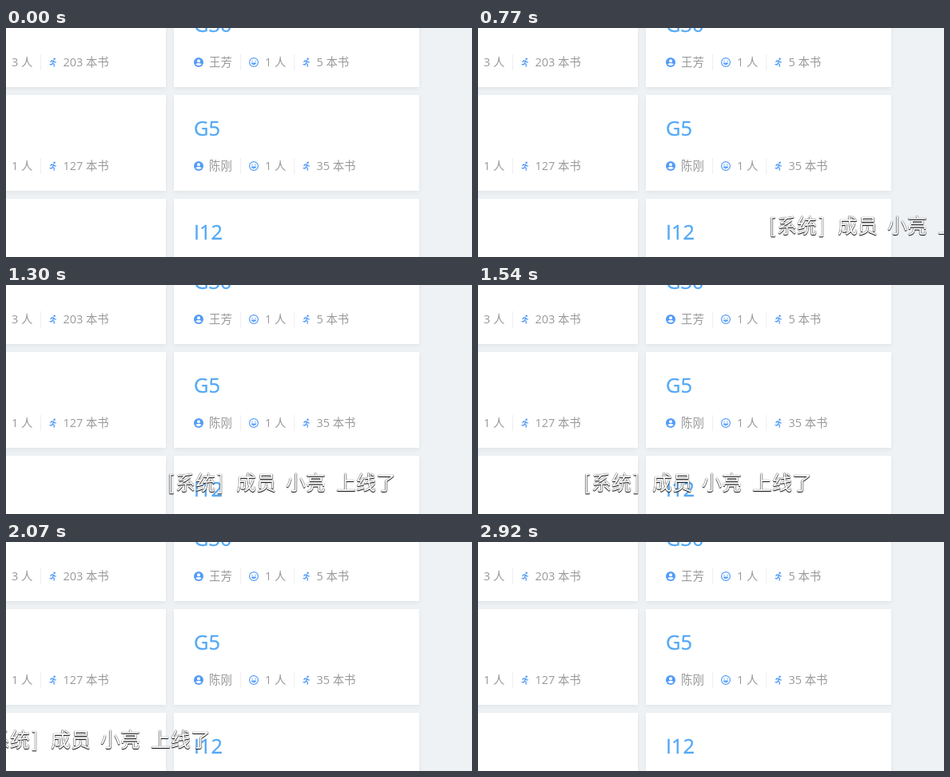
Recreate the animation shown at these times as an HTML page. Size 583 px wide and 287 px high, loop 3070 ms.

```html
<!DOCTYPE html>
<html lang="zh-CN">
<head>
<meta charset="utf-8">
<style>
  html, body { margin: 0; width: 100%; height: 100%; overflow: hidden; }
  body { position: relative; background: #eef2f5; font-family: "Open Sans", "Noto Sans CJK SC", "Noto Sans CJK", sans-serif; }
  .card { position: absolute; width: 307px; height: 120px; background: #fff; box-shadow: 0 2px 6px rgba(0, 0, 0, .06); }
  .card > *, .msg span { position: absolute; white-space: pre; }
  .title { left: 25px; top: 24px; font-size: 25.4px; line-height: 34px; color: #54a9f5; -webkit-text-stroke: .35px #54a9f5; }
  .meta { top: 79px; font-size: 14.4px; line-height: 20px; color: #999; }
  .rule { top: 79px; width: 1px; height: 20px; background: #eee; }
  svg { top: 83px; width: 12px; height: 12px; fill: none; stroke: #529bf8; stroke-width: 1.2; stroke-linecap: round; stroke-linejoin: round; }
  .solid { fill: #529bf8; stroke: none; }
  .white { fill: #fff; stroke: none; }
  .msg { position: absolute; left: 0; top: 228px; font: 25px/36px "Noto Sans CJK SC", "Noto Sans CJK", sans-serif; color: #fff;
    text-shadow: 0 1px 1px #000, 0 0 1px #000; }
</style>
</head>
<body>
<script>
const LOOP = 3070, STEP = 540 / 7, SHIFT = 162 / 7;

const icons = {
  user: '<circle class="solid" cx="6" cy="6" r="6"/><circle class="white" cx="6" cy="4.2" r="2"/><path class="white" d="M2.2 8.2Q6 5.6 9.8 8.2Q6 12.4 2.2 8.2"/>',
  smile: '<circle cx="6" cy="6" r="5.4"/><path d="M4 4.4v.4M8 4.4v.4M3.4 7.2q2.6 3 5.2 0z"/>',
  run: '<circle class="solid" cx="7.6" cy="1.8" r="1.3"/><path stroke-width="1.3" d="M2.8 5.6L4 4L6.5 4.2L5.3 7.2L7.2 8.5V11.2M6.8 4.5L7.8 5.8H9.4M4.9 7.6L4.2 9L2 8.7"/>'
};

const add = (parent, cls, x, html) => {
  const el = document.createElement('div');
  el.className = cls;
  el.style.left = x + 'px';
  el.innerHTML = html;
  return parent.appendChild(el);
};

const icon = (x, name) => `<svg viewBox="0 0 12 12" style="left:${x}px">${icons[name]}</svg>`;

function card(x, y, title, owner, people, books) {
  const el = add(document.body, 'card', x, icon(25, 'user') + icon(94, 'smile') + icon(160, 'run'));
  el.style.top = y + 'px';
  add(el, 'title', 25, title);
  add(el, 'meta', 44, owner);
  add(el, 'meta', 114, people + ' 人');
  add(el, 'meta', 178.5, books + ' 本书');
  add(el, 'rule', 83, '');
  add(el, 'rule', 150, '');
}

card(-107, -46, '', '', 3, 203);
card(-107, 84, '', '', 1, 127);
card(-107, 214, '', '', '', '');
card(210, -46, 'G30', '王芳', 1, 5);
card(210, 84, 'G5', '陈刚', 1, 35);
card(210, 214, 'I12', '', '', '');

const words = [[-2, '['], [8, '系统'], [60, ']'], [84, '成员'], [146, '小亮'], [209, '上线了']];
const msg = add(document.body, 'msg', 0, words.map(([x, s]) => `<span style="left:${x}px">${s}</span>`).join(''));

// The message advances in even steps, entering right and leaving left.
function draw(now) {
  const t = now % LOOP;
  const n = Math.floor((t - 63) / STEP) + 1;
  msg.style.transform = `translateX(${Math.round(597 - n * SHIFT)}px)`;
  requestAnimationFrame(draw);
}
draw(0);
</script>
</body>
</html>
```
